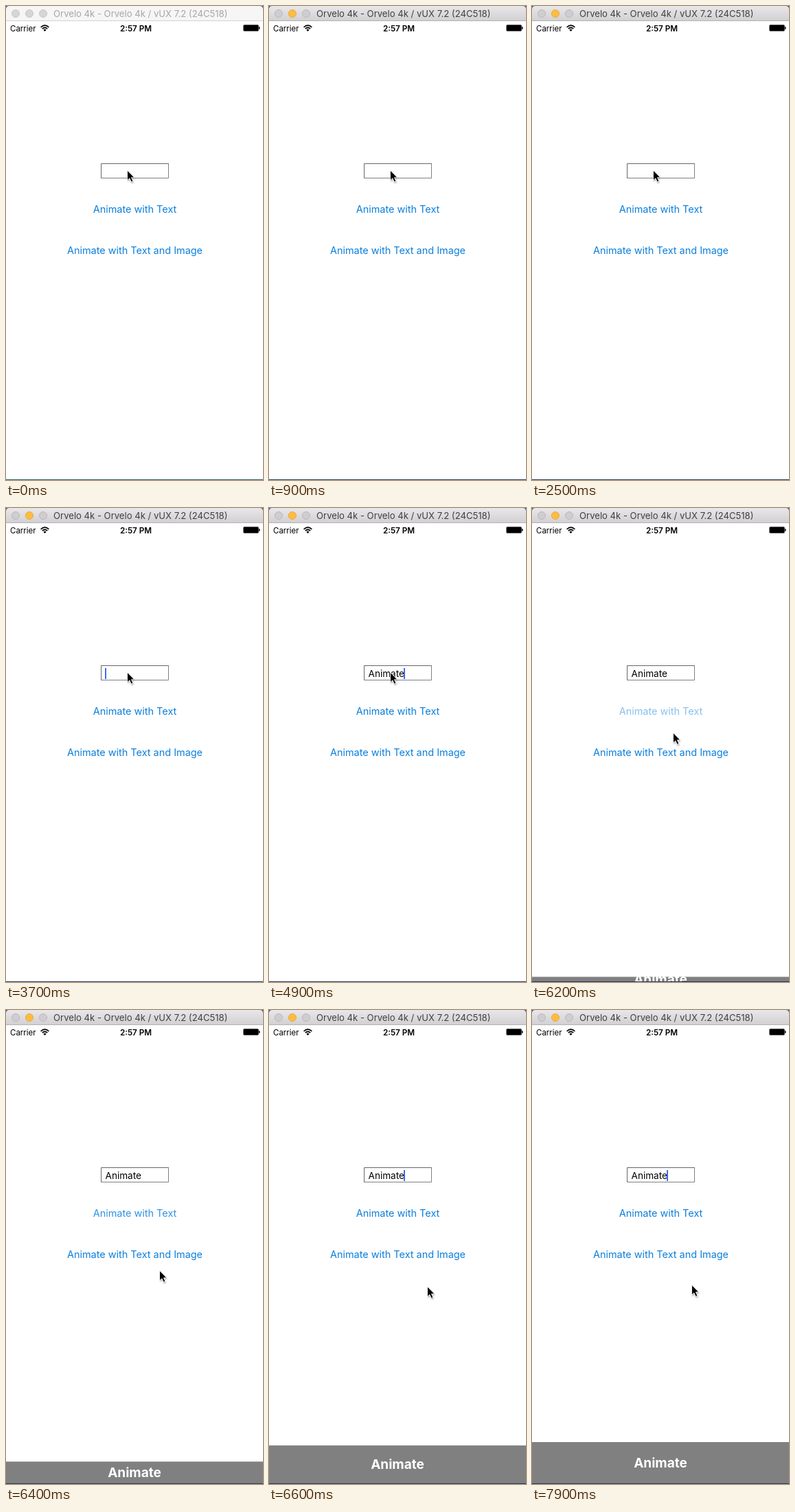
An HTML page for the animation above (8 s loop, 374 by 690 pixels).

```html
<!DOCTYPE html>
<html lang="en">
<head>
<meta charset="utf-8">
<title>Banner demo</title>
<style>
  html, body { margin: 0; width: 100%; height: 100%; overflow: hidden; background: #fff; }
  svg { display: block; font-family: Inter, "Liberation Sans", sans-serif; }
  .mid { text-anchor: middle; }
  .link { font-size: 14.45px; fill: #0b7fdc; }
</style>
</head>
<body>
<svg width="374" height="690" viewBox="0 0 374 690">
  <defs>
    <linearGradient id="active" x2="0" y2="1">
      <stop offset="0" stop-color="#e9e7e9"/>
      <stop offset="1" stop-color="#d1cfd1"/>
    </linearGradient>
    <filter id="soft" x="-50%" y="-50%" width="200%" height="200%">
      <feGaussianBlur stdDeviation=".8"/>
    </filter>
  </defs>

  <!-- window -->
  <rect width="374" height="12" fill="#4c5878"/>
  <path id="bar" d="M0 22V5Q0 0 5 0H369Q374 0 374 5V22Z"/>
  <rect id="rule" y="21" width="374" height="1"/>
  <g id="lights" stroke-width="1">
    <circle cx="14" cy="11" r="5.5"/>
    <circle id="amber" cx="34" cy="11" r="5.5"/>
    <circle cx="54" cy="11" r="5.5"/>
  </g>
  <text id="title" x="69" y="16" font-size="13.1">Orvelo 4k - Orvelo 4k / vUX 7.2 (24C518)</text>

  <!-- status bar -->
  <text x="6" y="36.5" font-size="11.5">Carrier</text>
  <g fill="none" stroke="#000" stroke-width="1.7">
    <path d="M50.6 31Q56.5 25.4 62.4 31"/>
    <path d="M52.8 33.2Q56.5 29.8 60.2 33.2"/>
  </g>
  <path d="M54.4 34.7Q56.5 33 58.6 34.7L56.5 37Z"/>
  <text class="mid" x="189" y="36.5" font-size="11.7" font-weight="600">2:57 PM</text>
  <rect x="345.5" y="27.5" width="22" height="9" rx="1.5" stroke="#666"/>
  <path d="M368 30Q369.6 30.2 369.6 32T368 34Z"/>

  <!-- form -->
  <path d="M138.5 250.5V229.5H236.5" fill="none" stroke="#666"/>
  <path d="M138 250.5H236.5V229" fill="none" stroke="#808080"/>
  <text id="field" x="144.5" y="246" font-size="13.6"></text>
  <rect id="caret" y="233" width="2" height="16" fill="#426bf2"/>
  <text id="button" class="mid link" x="187.5" y="301">Animate with Text</text>
  <text class="mid link" x="187.5" y="361">Animate with Text and Image</text>

  <!-- banner -->
  <rect id="panel" width="374" fill="#808080"/>
  <text id="label" class="mid" x="187" font-size="19" font-weight="700" fill="#fff">Animate</text>
  <rect id="edge" y="689" width="374" height="1"/>

  <g id="pointer">
    <path d="M0 0V15.2L3.5 12L6 17.6L8.8 16.4L6.4 11H11Z" transform="translate(.5 1.5)" filter="url(#soft)" opacity=".4"/>
    <path d="M0 0V15L3.4 11.8L5.8 17.2L8.5 16L6.1 10.8H10.6Z" stroke="#fff" stroke-width="1"/>
  </g>
</svg>
<script>
const LOOP = 8000, WORD = 'Animate';
const FOCUS = 3000, TYPE = 3750, KEY = 130;
const PRESS = 5900, RELEASE = 6040, RISE = 700;
const BOTTOM = 689, PANEL = 60;
// time, x, y of the pointer tip
const PATH = [
  [5000, 176.4, 239], [5200, 343, 380], [5400, 260, 332], [5700, 194.4, 295.5],
  [6080, 194.4, 295.5], [6400, 223.4, 379], [6600, 230.4, 402.5],
  [7400, 230.4, 402.5], [7600, 232.4, 400]
];

const $ = id => document.getElementById(id);
const set = (id, attrs) => {
  for (const k in attrs) $(id).setAttribute(k, attrs[k]);
};
const clamp = v => Math.min(1, Math.max(0, v));
const mix = (a, b, p) => a + (b - a) * p;

// cubic-bezier(.42, 0, .58, 1)
function easeInOut(x) {
  let lo = 0, hi = 1;
  for (let i = 0; i < 24; i++) {
    const s = (lo + hi) / 2, r = 1 - s;
    if (1.26 * s * r * r + 1.74 * s * s * r + s ** 3 < x) lo = s; else hi = s;
  }
  return lo * lo * (3 - 2 * lo);
}

function pointerAt(t) {
  const i = PATH.findIndex(p => p[0] > t);
  if (i === 0) return PATH[0].slice(1);
  if (i < 0) return PATH[PATH.length - 1].slice(1);
  const [t0, x0, y0] = PATH[i - 1], [t1, x1, y1] = PATH[i];
  const p = (t - t0) / (t1 - t0);
  return [mix(x0, x1, p), mix(y0, y1, p)];
}

function drawWindow(on) {
  set('bar', { fill: on ? 'url(#active)' : '#f6f6f6' });
  set('rule', { fill: on ? '#b4b2b4' : '#d2d2d2' });
  set('lights', { fill: on ? '#cfcdcf' : '#d6d6d6', stroke: on ? '#bab8ba' : '#c6c6c6' });
  set('amber', on ? { fill: '#fdbc40', stroke: '#e9ab3c' } : { fill: '#d6d6d6', stroke: '#c6c6c6' });
  set('title', { fill: on ? '#404040' : '#a6a6a6' });
  set('edge', { fill: on ? '#28395a' : '#2f5d60' });
}

function drawField(t) {
  const count = Math.max(0, Math.min(WORD.length, Math.floor((t - TYPE) / KEY) + 1));
  $('field').textContent = WORD.slice(0, count);
  const width = count ? $('field').getComputedTextLength() : 0;
  const typing = t >= TYPE && t < 5100;
  const phase = t % 1000;
  const lit = typing || phase < 100 || phase >= 500;
  set('caret', { x: Math.round(144 + width), opacity: t >= FOCUS && lit ? 1 : 0 });
}

function drawBanner(t) {
  const h = PANEL * easeInOut(clamp((t - RELEASE) / RISE));
  set('panel', { y: BOTTOM - h, height: h });
  set('label', { y: BOTTOM - h / 2 + 7, opacity: h > 0 ? 1 : 0 });
}

function draw() {
  const t = performance.now() % LOOP;
  drawWindow(t >= 500);
  drawField(t);
  const held = t >= PRESS && t < RELEASE;
  set('button', { opacity: held ? 0.2 : t < PRESS ? 1 : mix(0.2, 1, clamp((t - RELEASE) / 450)) });
  drawBanner(t);
  set('pointer', { transform: `translate(${pointerAt(t)})` });
  requestAnimationFrame(draw);
}
draw();
</script>
</body>
</html>
```
